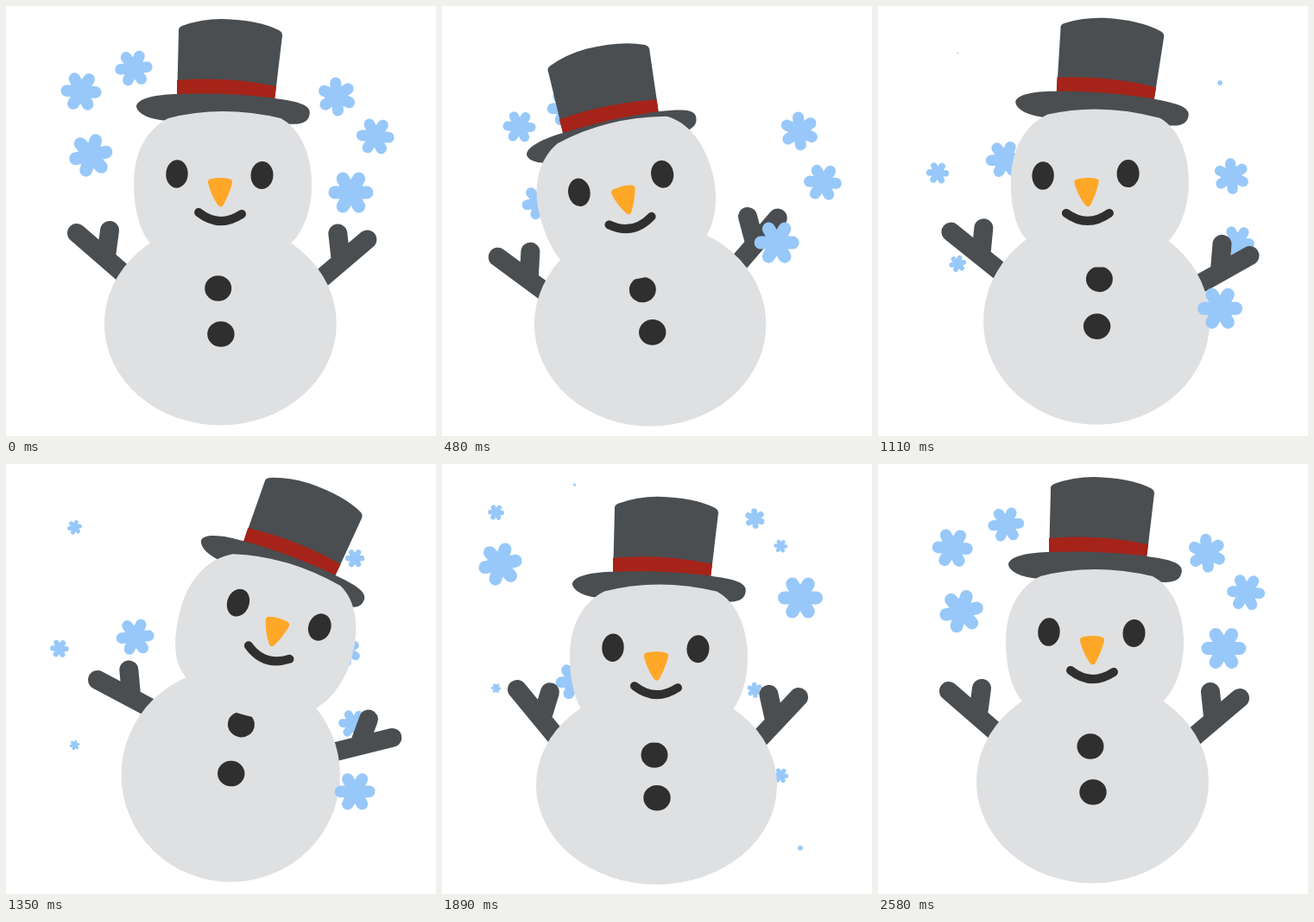
An HTML page that plays this animation: 498 px wide and 498 px high, repeating every 2.61 s.

```html
<!DOCTYPE html>
<html lang="en">
<head>
<meta charset="utf-8">
<title>Snowman</title>
<style>
html, body { margin: 0; width: 100%; height: 100%; overflow: hidden; background: #fff; }
svg { display: block; width: 100%; height: 100%; }
.snow { fill: #dfe0e2; }
.coal { fill: #2f2f2f; }
.felt { fill: #4a4e51; }
.arm { fill: none; stroke: #4a4e51; stroke-width: 22; stroke-linecap: round; }
.flake { fill: none; stroke: #97c8f9; stroke-width: .58; stroke-linecap: round; }
</style>
</head>
<body>
<svg viewBox="0 0 498 498">
  <g id="back"></g>
  <g id="hat">
    <path class="felt" d="M200 30 Q199 25 204 23 Q226 15 250 15 Q292 16 316 28 Q320 30 320 34 L311 110 H198 Z"/>
    <path fill="#a52319" d="M198 86 Q255 81 313 93 L311 108 Q255 100 198 104 Z"/>
    <path class="felt" d="M151 117 C150 107 176 102 200 102 C250 100 300 104 330 110 C350 114 354 120 351 128 C348 137 335 138 322 136 L186 133 C165 131 153 125 151 117 Z"/>
  </g>
  <g id="armL"><path class="arm" d="M82 263 L150 322 M120 260 L116 290"/></g>
  <g id="armR"><path class="arm" d="M419 271 L354 326 M385 264 L388 292"/></g>
  <ellipse id="body" class="snow"/>
  <g id="top"><ellipse class="coal" cx="246" cy="327" rx="15.500" ry="14.800"/></g>
  <g id="low"><ellipse class="coal" cx="249" cy="380" rx="15.700" ry="14.800"/></g>
  <path id="head" class="snow" d="M165 272 C152 255 148 228 148 205 C148 171 162 143 188 130 Q250 114 318 130 C341 142 354 172 354 207 C354 235 345 260 330 275 C310 295 280 305 251 305 C220 305 185 295 165 272 Z"/>
  <g id="face">
    <ellipse class="coal" cx="198" cy="194.500" rx="12.700" ry="16.300" transform="rotate(4 198 194)"/>
    <ellipse class="coal" cx="296.500" cy="196" rx="13" ry="16" transform="rotate(4 296 196)"/>
    <path fill="#ffa726" d="M234 205 Q233 201 238 200 Q249 198 258 200 Q263 201 262 205 Q259 217 252 230 Q249 235 245 230 Q237 218 234 205 Z"/>
    <path d="M223 239 Q247 258 273 241" fill="none" stroke="#2f2f2f" stroke-width="10" stroke-linecap="round"/>
  </g>
  <g id="front"></g>
</svg>
<script>
const LOOP = 2610, STEP = 30, GROUND = 488;
const $ = id => document.getElementById(id);
const moves = [];

// Smooth curve through [time, value] keys that never overshoots a key.
function curve(...keys) {
  const slope = i => (keys[i + 1][1] - keys[i][1]) / (keys[i + 1][0] - keys[i][0]);
  const tan = keys.map((_, i) => {
    if (i === 0 || i === keys.length - 1) return 0;
    const a = slope(i - 1), b = slope(i);
    return a * b > 0 ? 2 * a * b / (a + b) : 0;
  });
  return t => {
    let i = 0;
    while (i < keys.length - 2 && t > keys[i + 1][0]) i++;
    const [[t0, v0], [t1, v1]] = [keys[i], keys[i + 1]], h = t1 - t0;
    const u = Math.min(1, Math.max(0, (t - t0) / h)), w = 1 - u;
    return w * w * ((1 + 2 * u) * v0 + u * h * tan[i]) +
           u * u * ((1 + 2 * w) * v1 - w * h * tan[i + 1]);
  };
}

// Lean: -1 is left, 1 is right. Squash: 1 is low, negative is stretched.
const lean = curve([0, 0], [560, -1.06], [840, -.96], [1360, 1], [1800, 0]);
const squash = curve([0, 0], [480, .15], [840, -.1], [1350, 0], [1890, 1], [2060, -.5], [2240, .05], [LOOP, 0]);

// Offsets [x, y, turn] at full left, right and squash; a lag makes a part trail.
function part(id, [px, py], lag, left, right, low = [0, .062 * (GROUND - py), 0]) {
  moves.push(t => {
    const s = lean(t - lag), q = squash(t);
    const side = s < 0 ? left : right;
    const [x, y, turn] = side.map((v, i) => v * Math.abs(s) + low[i] * q);
    $(id).setAttribute('transform',
      `translate(${px + x} ${py + y}) rotate(${turn}) translate(${-px} ${-py})`);
  });
}

part('hat', [252, 120.5], 0, [-55, 27, -15], [69, 3, 18]);
part('head', [251, 205], 0, [-38, 9, -14], [51, -11, 16.5]);
part('face', [247, 195], 50, [-44, 8, -14.5], [74, -22, 17]);
part('top', [246, 327], -50, [-13, 0, -7], [27, -26, 10]);
part('low', [249, 380], -50, [-5, -3, -3], [12, -22, 5]);
part('armL', [82, 263], 0, [-18, 28, -6], [24, -13, -13], [5, -2, 9.5]);
part('armR', [419, 271], -50, [-28, -24, -7.5], [29, 47, 27], [-6, -1, -6.5]);

moves.push(t => {
  const s = lean(t + 50), q = squash(t), up = Math.max(0, s);
  const shape = {
    cx: 248.5 + (s < 0 ? 7 : 12) * s,
    cy: 368 - 8 * up + 4 * q,
    rx: 134.5 - Math.abs(s) - 7 * up + 5 * q,
    ry: 117.5 + Math.abs(s) + 5.5 * up - 2.5 * q
  };
  for (const k in shape) $('body').setAttribute(k, shape[k]);
});

const rays = [0, 60, 120].map(a => {
  const x = .71 * Math.cos(a * Math.PI / 180), y = .71 * Math.sin(a * Math.PI / 180);
  return `M${-x} ${-y} L${x} ${y}`;
}).join(' ');

// A flake falls from y at time 0 while swaying about x, farthest right at peak.
// Its life outlasts one loop, so two copies fall.
function flake({ layer = 'back', x, sway, peak, y, speed, size, born, gone = 2500, fade = 1500, tilt = 0 }) {
  for (const lag of [0, LOOP]) {
    const el = document.createElementNS('http://www.w3.org/2000/svg', 'path');
    el.setAttribute('class', 'flake');
    el.setAttribute('d', rays);
    $(layer).appendChild(el);
    moves.push(t => {
      const age = t - lag;
      const r = size * Math.min(1, (age - born) / 800, (gone - age) / fade);
      el.setAttribute('visibility', r > .1 ? 'visible' : 'hidden');
      if (r <= .1) return;
      const fx = x + sway * Math.cos(2 * Math.PI * (age - peak) / LOOP);
      const fy = y + speed * age * (age < 0 ? .7 : 1);
      el.setAttribute('transform', `translate(${fx} ${fy}) rotate(${tilt}) scale(${r})`);
    });
  }
}

flake({ x: 75, sway: 16, peak: 300, y: 99, speed: .085, size: 23.5, born: -1040, fade: 2500, tilt: 3 });
flake({ x: 148.5, sway: 5, peak: -700, y: 72, speed: .095, size: 22, born: -790, fade: 300, tilt: -5 });
flake({ x: 90, sway: 23, peak: 500, y: 173, speed: .113, size: 25.5, born: -1530, gone: 1700, tilt: -12 });
flake({ x: 390, sway: 30, peak: 750, y: 105, speed: .083, size: 22.5, born: -1140, tilt: 25 });
flake({ x: 416, sway: 25, peak: 450, y: 151, speed: .111, size: 22, born: -1010, tilt: 4 });
flake({ layer: 'front', x: 401, sway: 14, peak: -700, y: 216, speed: .121, size: 26, born: -1600, gone: 1980, fade: 700 });

const start = performance.now();
function tick() {
  const t = (performance.now() - start) % LOOP;
  const now = Math.floor(t / STEP) * STEP;
  for (const move of moves) move(now);
  requestAnimationFrame(tick);
}
tick();
</script>
</body>
</html>
```
